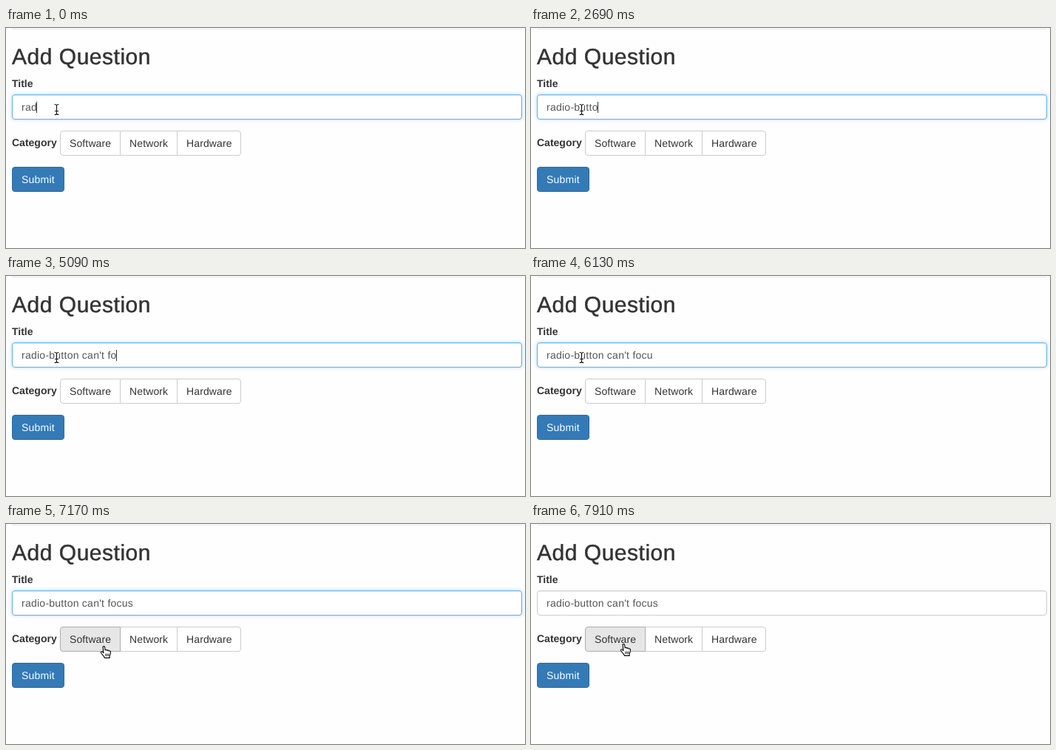
These frames come from a looping animation (702x298 px, 8000 ms). An HTML page:

```html
<!DOCTYPE html>
<html lang="en">
<head>
<meta charset="utf-8">
<title>Add Question</title>
<style>
  html, body { margin: 0; width: 100%; height: 100%; overflow: hidden; background: #fefefe; }
  svg { display: block; width: 702px; height: 298px; }
  text {
    font: 14px "Liberation Sans", Arial, sans-serif;
    fill: #333;
    white-space: pre;
    text-rendering: geometricPrecision;
  }
  .heading { font-size: 30px; letter-spacing: .52px; stroke: #333; stroke-width: .45px; }
  .label { font-weight: bold; }
  .button { letter-spacing: .12px; }
  .typed { fill: #555; letter-spacing: .25px; }
  .box { fill: #fff; stroke: #ccc; }
  .hover { fill: #e6e6e6; stroke: #adadad; }
</style>
</head>
<body>
<svg viewBox="0 0 702 298">
  <defs>
    <filter id="blur" x="-5%" y="-50%" width="110%" height="200%">
      <feGaussianBlur stdDeviation="2.5"/>
    </filter>
  </defs>
  <rect width="702" height="298" fill="#fefefe"/>
  <rect x="8" y="1" width="690" height="1" fill="#e6e6e6"/>
  <text class="heading" x="8" y="49">Add Question</text>
  <text class="label" x="8" y="80">Title</text>

  <rect id="glow" x="8" y="90" width="690" height="34" rx="4" fill="#66afe9" opacity=".5" filter="url(#blur)"/>
  <rect id="field" x="8.5" y="90.5" width="689" height="33" rx="3.5" fill="#fff"/>
  <path d="M11 91.5H695" stroke="#000" stroke-opacity=".06"/>
  <text id="typed" class="typed" x="21" y="112"></text>
  <rect id="caret" y="100" width="1" height="15" fill="#333"/>

  <text class="label" x="8" y="160">Category</text>
  <path class="box" d="M231.5 139.5H314a3.5 3.5 0 0 1 3.5 3.5V169a3.5 3.5 0 0 1-3.5 3.5H231.5Z"/>
  <path class="box" d="M154.5 139.5H231.5V172.5H154.5Z"/>
  <path id="software" class="box" d="M154.5 139.5H77a3.5 3.5 0 0 0-3.5 3.5V169a3.5 3.5 0 0 0 3.5 3.5H154.5Z"/>
  <text class="button" x="86" y="161">Software</text>
  <text class="button" x="167" y="161">Network</text>
  <text class="button" x="244" y="161">Hardware</text>

  <rect id="submit" x="8.5" y="188.5" width="70" height="33" rx="3.5"/>
  <text class="button" x="21" y="210" style="fill:#fff;letter-spacing:.22px">Submit</text>

  <g id="beam" fill="none" stroke-linecap="round">
    <path id="beamShape" d="M66 103.5Q68.5 103.5 68.5 105.5Q68.5 103.5 71 103.5M68.5 105V115.5M66.5 112.5H70.5M66 117.5Q68.5 117.5 68.5 115.5Q68.5 117.5 71 117.5" stroke="#fff" stroke-width="2.6"/>
    <use href="#beamShape" id="beamInk"/>
  </g>
  <g id="hand" stroke="#000" stroke-linejoin="round">
    <path fill="#fff" stroke-width="1.1" d="M3.6 1.8C3.6.2 6 .2 6.1 1.8L6.6 6C7 5 9 5 9.2 6.4C9.8 5.6 11.4 5.8 11.6 7.1C12.4 6.4 14 7 14 8.6C14 11 13.4 12.4 12.6 13.6V16.4H6C5.6 14.4 3 12.4 1.2 9.8C.2 8.4 1.8 7.2 3 8.2L4.4 9.6Z"/>
    <path fill="none" stroke-width=".9" d="M7.3 10.6V14M9.3 10.6V14M11.3 10.6V14"/>
  </g>
</svg>
<script>
  const LOOP = 8000;
  const TITLE = "radio-button can't focus";
  const START_CHARS = 3;
  const KEY_TIMES = [450, 590, 1190, 1490, 1640, 1940, 2390, 2690, 2990, 3140, 3590,
    3890, 4040, 4190, 4340, 4490, 4790, 5090, 5540, 5680, 6280];
  const CARET_ON = 450;
  const BLUR_TIME = 7460;
  // time, x, y of the hand pointer
  const HAND_STEPS = [
    [6730, 60, 194], [6880, 74.5, 179], [7020, 108, 169], [7170, 127.5, 165],
    [7320, 126, 163], [7460, 123, 161], [7610, 119, 159], [7760, 117.5, 158.5],
    [7910, 120.5, 162]
  ];

  const el = id => document.getElementById(id);
  const show = (id, on) => el(id).setAttribute("visibility", on ? "visible" : "hidden");
  const paint = (id, fill, stroke) => {
    el(id).setAttribute("fill", fill);
    el(id).setAttribute("stroke", stroke);
  };

  // The beam is one outline drawn twice: white halo, then dark ink.
  const ink = el("beamShape").cloneNode();
  ink.removeAttribute("id");
  ink.setAttribute("stroke", "#111");
  ink.setAttribute("stroke-width", "1.1");
  el("beamInk").replaceWith(ink);

  function drawField(t) {
    const keys = KEY_TIMES.filter(k => k <= t);
    const lastKey = keys.length ? keys[keys.length - 1] : 0;
    const typed = el("typed");
    typed.textContent = TITLE.slice(0, START_CHARS + keys.length);
    el("caret").setAttribute("x", Math.floor(21 + typed.getComputedTextLength()));
    show("caret", t - lastKey < CARET_ON);

    const focused = t < BLUR_TIME;
    show("glow", focused);
    el("field").setAttribute("stroke", focused ? "#66afe9" : "#ccc");
  }

  function drawPointer(t) {
    const step = HAND_STEPS.filter(s => s[0] <= t).pop();
    show("beam", !step);
    show("hand", step);
    if (step) el("hand").setAttribute("transform", `translate(${step[1]} ${step[2]})`);

    const onSubmit = step === HAND_STEPS[0];
    paint("submit", onSubmit ? "#286090" : "#337ab7", onSubmit ? "#204d74" : "#2e6da4");
    el("software").setAttribute("class", step && !onSubmit ? "hover" : "box");
  }

  function draw(t) {
    drawField(t);
    drawPointer(t);
  }

  const start = performance.now();
  function tick() {
    draw((performance.now() - start) % LOOP);
    requestAnimationFrame(tick);
  }
  tick();
</script>
</body>
</html>
```
